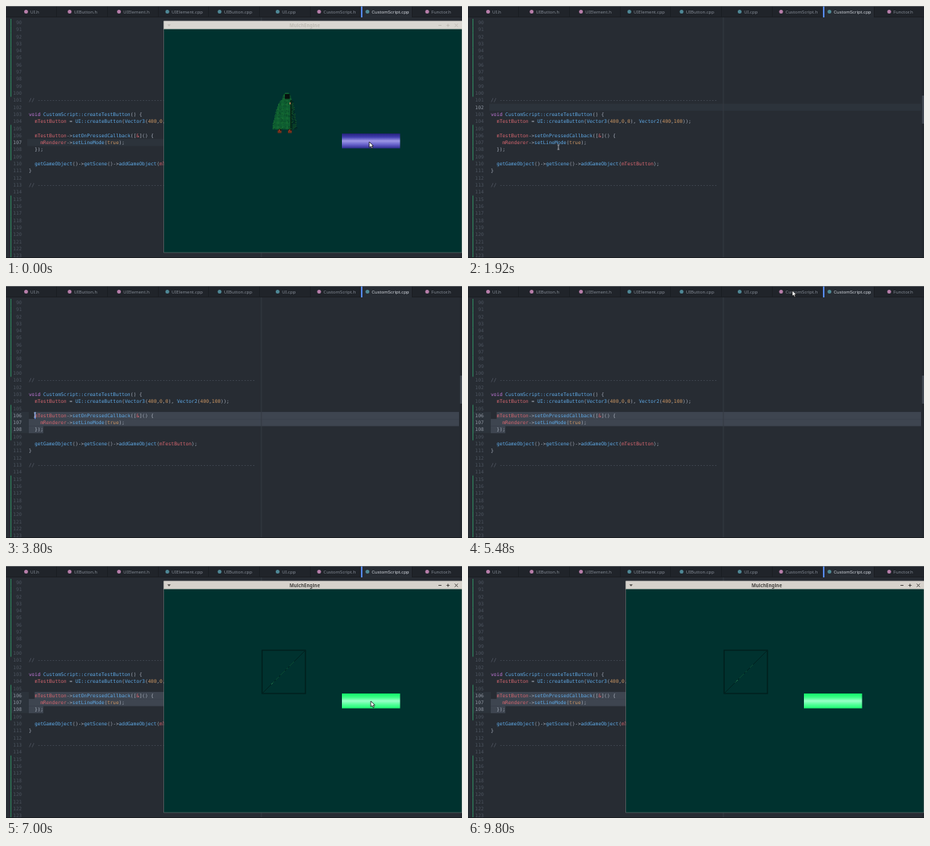
An HTML page with a canvas for the animation above (10000 ms loop, 600 px wide and 332 px high).

```html
<!DOCTYPE html>
<html lang="en">
<head>
<meta charset="utf-8">
<title>Line mode button</title>
<style>
  html, body { margin: 0; width: 100%; height: 100%; overflow: hidden; background: #272c33; }
  canvas { display: block; width: 100%; height: 100%; }
</style>
</head>
<body>
<canvas id="stage" width="600" height="332"></canvas>
<script>
const ctx = document.getElementById('stage').getContext('2d');
const LOOP = 10000;
const MONO = '6.35px "DejaVu Sans Mono", monospace';
const SANS = '5.95px "Noto Sans", sans-serif';
const COL = 3.823, ROW = 9.31, LEFT = 30, TAB = 66.85;

// Times of the hard changes
const CLICK_EDITOR = 1400, PRESS = 2400, DRAG_107 = 2640, DRAG_106 = 3520,
      REOPEN = 6080, CLICK_BUTTON = 6920;

const rule = '// ' + '-'.repeat(75);
const code = {
  101: rule,
  103: 'void CustomScript::createTestButton() {',
  104: '  mTestButton = UI::createButton(Vector3(400,0,0), Vector2(400,100));',
  106: '  mTestButton->setOnPressedCallback([&]() {',
  107: '    mRenderer->setLineMode(true);',
  108: '  });',
  110: '  getGameObject()->getScene()->addGameObject(mTestButton);',
  111: '}',
  113: rule
};

// One capture group per colour: comment, keyword, member, literal, name, punctuation
const TOKEN = /(\/\/.*)|(void)|(m[A-Z]\w*|&)|(\d+|true)|([A-Za-z][\w:]*)|([^\s\w]+?)/g;
const INK = ['#5c6370', '#bf76d6', '#d5666f', '#cb9563', '#5fa9e6', '#a5acb9'];

const tabs = ['UI.h', 'UIButton.h', 'UIElement.h', 'UIElement.cpp', 'UIButton.cpp', 'UI.cpp',
  'CustomScript.h', 'CustomScript.cpp', 'Functor.h'];
const ACTIVE_TAB = 7;

// Key points of the pointer: time, x, y
const path = [
  [0, 478, 179], [1080, 139, 132], [1500, 137, 132], [1920, 119, 186], [2360, 50, 189],
  [2640, 39, 182], [3440, 39, 176], [3600, 38, 170], [3800, 38, 170], [4800, 373, 109],
  [5700, 436, -12], [6400, 440, -12], [6700, 480, 178], [7400, 480, 178], [8120, 371, 150],
  [8500, 371, 150], [9780, 597, -12], [LOOP, 597, -12]
];

function pointer(t) {
  const i = path.findIndex(k => k[0] > t);
  const [t0, x0, y0] = path[i - 1], [t1, x1, y1] = path[i];
  const k = (t - t0) / (t1 - t0), e = k * k * (3 - 2 * k);
  return [x0 + (x1 - x0) * e, y0 + (y1 - y0) * e];
}

function noise(a, b) {
  const v = Math.sin(a * 12.9898 + b * 78.233) * 43758.5453;
  return v - Math.floor(v);
}

function box(color, x, y, w, h) {
  ctx.fillStyle = color;
  ctx.fillRect(x, y, w, h);
}

function line(color, width, x0, y0, x1, y1) {
  ctx.strokeStyle = color;
  ctx.lineWidth = width;
  ctx.beginPath();
  ctx.moveTo(x0, y0);
  ctx.lineTo(x1, y1);
  ctx.stroke();
}

function poly(color, pts) {
  ctx.fillStyle = color;
  ctx.beginPath();
  for (const [x, y] of pts) ctx.lineTo(x, y);
  ctx.closePath();
  ctx.fill();
}

function text(str, x, y, color, font, align = 'left') {
  ctx.font = font;
  ctx.textAlign = align;
  ctx.fillStyle = color;
  ctx.fillText(str, x, y);
}

const rowY = n => 124 + (n - 101) * ROW;
const rowTop = n => rowY(n) - ROW / 2;

function drawTabs() {
  box('#20242a', 0, 0, 600, 15);
  tabs.forEach((name, i) => {
    const x = i * TAB, active = i === ACTIVE_TAB;
    if (active) box('#272c33', x, 0, TAB, 15);
    else box('#1a1d22', x, 14, TAB, 1);
    box(active ? '#568af2' : '#1a1d22', Math.round(x) - 1, 0, active ? 2 : 1, 15);
    ctx.font = SANS;
    const textX = x + (TAB - ctx.measureText(name).width + 9) / 2;
    ctx.fillStyle = name.endsWith('.h') ? '#b87fab' : '#4f8896';
    ctx.beginPath();
    ctx.arc(textX - 5.7, 7.6, 2.5, 0, 7);
    ctx.fill();
    text(name, textX, 9.8, active ? '#d0d4db' : '#828993', SANS);
  });
  box('#6c7074', 0, 0, 600, .7);
}

// Shades the current line or the selection and returns its first and last row
function drawMarks(t) {
  const single = t < CLICK_EDITOR ? 107 : t < PRESS ? 102 : t < DRAG_107 ? 108 : 0;
  if (single) {
    box('#2c333b', LEFT - 2, rowTop(single), 598 - LEFT, ROW);
    return [single, single];
  }
  const first = t < DRAG_106 ? 107 : 106;
  box('#2c333b', 7, rowTop(first), LEFT - 7, ROW * (109 - first));
  for (let n = first; n <= 108; n++) {
    const x = n === first ? LEFT + 2 * COL : LEFT;
    box('#3e4550', x, rowTop(n), (n === 108 ? LEFT + 5 * COL : 596) - x, ROW + .1);
  }
  return [first, 108];
}

function drawCaret(t) {
  const on = t < 3480 || Math.floor((t - 3480) / 400) % 2 === 0;
  if (on && t >= DRAG_107 && t < CLICK_BUTTON) {
    box('#528bff', LEFT + 2 * COL, rowTop(t < DRAG_106 ? 107 : 106), 1.2, ROW);
  }
}

function drawEditor(t) {
  box('#272c33', 0, 0, 600, 332);
  const [from, to] = drawMarks(t);
  box('#343a42', 335.5, 15, 1, 317);
  for (let n = 90; n <= 123; n++) {
    const y = rowY(n) + 2.3, lit = n >= from && n <= to;
    const changed = n <= 100 || (n >= 105 && n <= 109) || n >= 115;
    if (changed) box('#2f8a60', 6, rowTop(n), 1, ROW + .2);
    text(n, 20.8, y, lit ? '#8d949f' : '#4b525d', MONO, 'right');
    for (const m of (code[n] || '').matchAll(TOKEN)) {
      const kind = m.slice(1).findIndex(g => g !== undefined);
      text(m[0], LEFT + m.index * COL, y, INK[kind], MONO);
    }
  }
  drawCaret(t);
  box('#23282e', 597, 15, 3, 317);
  box('#434a53', 597.5, 118, 2.5, 37);
  box('#1a1d22', 0, 331, 600, 1);
  drawTabs();
}

// Idle sway of the cloaked figure, 0 to 1
function sway(t) {
  const turn = t < REOPEN ? t / 1056 : (t - REOPEN) / 1056 + .5;
  return .5 - .5 * Math.cos(2 * Math.PI * turn);
}

// The figure is built of square cells: a cloak that widens downwards,
// its right side a loose checker of dark and light cells
function drawFigure(p) {
  const size = 1.2, top = 124 + p, bottom = 161.5;
  for (const x of [358, 371.5]) {
    box('#1d0c09', x, 160.5, 4.5, 4);
    box('#74301c', x - .5, 164, 5, 3.4 - p);
    box('#b04a2a', x + 1, 162.5, 1.2, 2);
  }
  for (let y = top, r = 0; y < bottom; y += size, r++) {
    const v = (y - top) / (bottom - top);
    const left = 361 - 12 * v ** .6 + 2 * p * v, right = 377 + 5.5 * v + p;
    for (let c = Math.ceil((left + noise(r, 1) - 340) / size); 340 + c * size < right; c++) {
      const x = 340 + c * size, grain = noise(r, c);
      let color = grain > .88 ? '#0d5229' : '#146a33';
      if (x > 375 + p) color = (r + c) % 2 ? '#05211b' : grain > .4 ? '#176534' : '#00322f';
      box(color, x, y, size + .1, size + .1);
    }
  }
  for (let r = 0; r < 8; r++) {
    const half = 2.5 + 4 * Math.sqrt(r / 8);
    box(r % 3 ? '#0f5a2d' : '#146a33', 369.5 - half, top - 9.5 + r * size, 2 * half, size + .1);
  }
  box('#07110f', 367, top - 8, 6.5, 6.5);
  box('#07130f', 374.3 + p, top, 1.4, bottom - top);
  box('#c98a60', 373 + p, top + 3, 1.5, 2.5);
}

function drawWire(t) {
  ctx.strokeStyle = '#001b1a';
  ctx.lineWidth = 1.2;
  ctx.strokeRect(337, 111, 57, 57);
  line('#00211f', 1, 337, 168, 394, 111);
  // texture showing through the diagonal
  const step = Math.floor(t / 264);
  for (let i = 12; i < 42; i += 2) {
    const v = noise(i, step);
    if (v > .4) line(v > .9 ? '#2a8a55' : '#0c5536', .8, 337 + i, 168 - i, 339 + i, 166 - i);
  }
}

// Edge, shoulder, centre, shoulder, edge
function drawButton(lit) {
  const colors = lit
    ? ['#12f86a', '#38fc84', '#98ffc8', '#52ff98', '#1cfa72']
    : ['#24227a', '#423fb0', '#9d97e6', '#6661ca', '#302c90'];
  const g = ctx.createLinearGradient(0, 168, 0, 187.5);
  colors.forEach((c, i) => g.addColorStop(i / 4, c));
  box(g, 442, 168, 76.5, 19.5);
}

function drawWindow(t) {
  const active = t >= CLICK_BUTTON;
  const ink = active ? '#45423f' : '#bfbbb5';
  box('#66716f', 207.4, 20, 392.6, 305.2);
  box(active ? '#d6d2cc' : '#d9d6d1', 207.5, 19.6, 392.5, 11);
  box('#00322f', 208, 30.6, 391.5, 294);
  poly(ink, [[212.3, 24.3], [216.7, 24.3], [214.5, 26.8]]);
  text('MulchEngine', 393, 27.8, ink, 'bold 6.2px "Noto Sans", sans-serif', 'center');
  const y = 25.5, d = 2;
  line(ink, 1, 571 - d, y, 571 + d, y);
  line(ink, 1, 581.6 - d, y, 581.6 + d, y);
  line(ink, 1, 581.6, y - d, 581.6, y + d);
  line(ink, 1, 592.5 - d, y - d, 592.5 + d, y + d);
  line(ink, 1, 592.5 - d, y + d, 592.5 + d, y - d);
  if (active) drawWire(t);
  else drawFigure(sway(t));
  drawButton(active);
}

function drawArrow(x, y) {
  ctx.save();
  ctx.translate(x, y);
  poly('#ffffff', [[0, 0], [0, 7.4], [1.8, 5.9], [3, 8.6], [4.4, 8], [3.2, 5.4], [5.4, 5.2]]);
  ctx.strokeStyle = '#101010';
  ctx.lineWidth = .8;
  ctx.stroke();
  ctx.restore();
}

function drawBeam(x, y) {
  line('#c3c8cf', .8, x, y - 3, x, y + 3);
  for (const end of [y - 3, y + 3]) line('#c3c8cf', .7, x - 1.4, end, x + 1.4, end);
}

function draw(t) {
  const open = t < CLICK_EDITOR || t >= REOPEN;
  drawEditor(t);
  if (open) drawWindow(t);
  const [x, y] = pointer(t);
  const overWindow = open && x > 207 && y > 19;
  if (y < 15 || overWindow) drawArrow(x, y);
  else drawBeam(x, y);
}

const start = performance.now();
function tick() {
  draw((performance.now() - start) % LOOP);
  requestAnimationFrame(tick);
}
tick();
</script>
</body>
</html>
```
